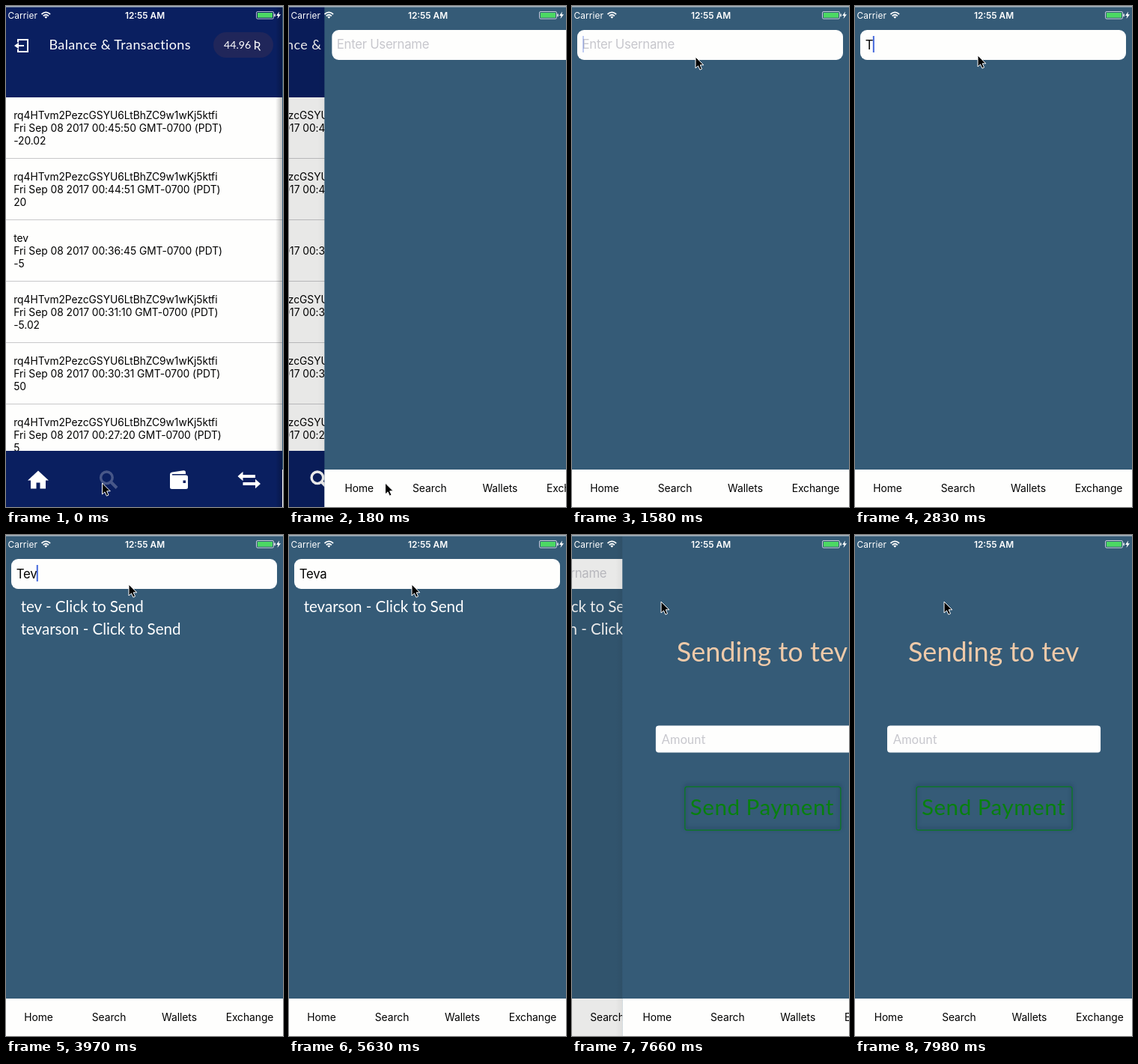
Write an HTML page that moves like this. It is 370x669 px and loops after 8 s.

```html
<!DOCTYPE html>
<html lang="en">
<head>
<meta charset="utf-8">
<title>Wallet app</title>
<style>
  html, body { margin: 0; width: 100%; height: 100%; overflow: hidden; background: #355b77; }
  svg { display: block; width: 370px; height: 669px; }
  text { white-space: pre; }
  .ui { font: 13.8px Inter, sans-serif; letter-spacing: -.03px; }
  .field { font: 16.77px Inter, sans-serif; letter-spacing: -.3px; }
  .bar { font: 11.84px Inter, sans-serif; fill: #fff; }
  .clock { font-weight: 600; }
  .brand { font-family: Lato, sans-serif; }
</style>
</head>
<body>
<svg id="stage" viewBox="0 0 370 669" xmlns="http://www.w3.org/2000/svg"></svg>
<script>
const LOOP = 8000, WIDTH = 372, PARALLAX = 0.3;
const NAVY = '#0a1f60', BLUE = '#355b77', WHITE = '#fefefd', HINT = '#c7c7cd';
const ADDRESS = 'rq4HTvm2PezcGSYU6LtBhZC9w1wKj5ktfi';

const rect = (x, y, w, h, fill, more = '') =>
  `<rect x="${x}" y="${y}" width="${w}" height="${h}" fill="${fill}" ${more}/>`;
const label = (x, y, str, cls, more = '') =>
  `<text x="${x}" y="${y}" class="${cls}" ${more}>${str}</text>`;
const brand = (x, y, str, size, gap, fill, more = '') =>
  label(x, y, str, 'brand', `font-size="${size}" letter-spacing="${gap}" fill="${fill}" ${more}`);

const entries = [
  [ADDRESS, '00:45:50', '-20.02'],
  [ADDRESS, '00:44:51', '20'],
  ['tev', '00:36:45', '-5'],
  [ADDRESS, '00:31:10', '-5.02'],
  [ADDRESS, '00:30:31', '50'],
  [ADDRESS, '00:27:20', '5']
];

function entry([who, time, amount], i) {
  const y = 122 + 82 * i;
  return label(10.2, y + 28.5, who, 'ui') +
    label(10.2, y + 45.5, `Fri Sep 08 2017 ${time} GMT-0700 (PDT)`, 'ui') +
    label(10.2, y + 62.5, amount, 'ui') +
    rect(0, y + 81, 376, 1, '#c8c8ca');
}

const icons = `
  <g fill="#fff">
    <path d="M43 620.5L57 633.5H53V644.5H45.5V636.5H40.5V644.5H33V633.5H29Z"/>
    <g id="lens" fill="none" stroke="#fff" stroke-width="3.4">
      <circle cx="134.4" cy="629.8" r="7.8"/><path d="M140 635.5L148 643.5" stroke-width="4"/>
    </g>
    <path fill-rule="evenodd" d="M219 625.5Q219 623 222 622.4L237 620.3Q240 620 240 623V625H222V626.5H240.5Q243 626.5 243 629V642.5Q243 645 240.5 645H221.5Q219 645 219 642.5ZM236.5 633.5V637H240V633.5Z"/>
    <path d="M309.5 628L316.5 621.8V626H333V630H316.5V634.2ZM340 638L333 631.8V636H316.5V640H333V644.2Z"/>
  </g>`;

const homeScreen =
  rect(0, 0, 376, 669, WHITE) + entries.map(entry).join('') +
  rect(0, 0, 376, 122, NAVY) + rect(0, 594, 376, 75, NAVY) +
  `<path d="M16 48.5V45H29V61H16V57.5M16 53H24" fill="none" stroke="#fff" stroke-width="2"/>
   <path d="M11 53L17 48.8V57.2Z" fill="#fff"/>` +
  brand(57.5, 58, 'Balance &amp; Transactions', 18, .37, '#fff') +
  rect(277, 35, 80, 34, '#20265a', 'rx="17"') +
  brand(291, 57, '44.96', 14.2, 0, '#fff') +
  `<text x="330.5" y="57.5" font-family="Noto Sans, DejaVu Sans, sans-serif" font-size="16" fill="#fff">Ʀ</text>` +
  icons;

// Backdrop, edge shadow and tab bar shared by the pushed screens
const page = body =>
  `<g class="edge">${rect(-12, 2, 9, 667, 'url(#edge)')}</g>` +
  rect(-3, 0, 380, 669, BLUE) + body + rect(-3, 619, 380, 50, WHITE) +
  ['Home', 'Search', 'Wallets', 'Exchange'].map((name, i) =>
    label(43.5 + 94 * i, 649, name, 'ui', 'text-anchor="middle"')).join('');

const searchScreen = page(
  rect(7, 32, 355, 40, WHITE, 'rx="9"') +
  label(13.5, 57.2, 'Enter Username', 'field', `id="hint" fill="${HINT}"`) +
  label(13.8, 57.5, '', 'field', 'id="typed"') +
  rect(14, 40, 2, 22, '#4468dc', 'id="caret"') +
  [0, 1, 2, 3].map(i => brand(19.7, 103 + 30 * i, '', 20.6, -.04, '#fff', 'data-row')).join(''));

const sendScreen = page(
  brand(183.7, 169, 'Sending to tev', 36, .05, '#efcaa9', 'text-anchor="middle"') +
  rect(41.6, 254.5, 285, 36, WHITE, 'rx="4"') +
  brand(49.6, 279, 'Amount', 16.3, .2, HINT) +
  rect(80.6, 336.2, 208, 58, 'none',
    'rx="3" stroke="#087d1c" stroke-width="1.2" style="filter:drop-shadow(0 -2px 2.5px rgba(8,24,66,.6))"') +
  brand(87.6, 374, 'Send Payment', 29.6, .5, '#08800f'));

const statusBar = `
  ${rect(0, 0, 370, 1.6, '#a9b5be')}
  ${label(2.6, 16.5, 'Carrier', 'bar', 'letter-spacing=".1"')}
  ${label(185.5, 16.5, '12:55 AM', 'bar clock', 'text-anchor="middle"')}
  <g fill="none" stroke="#fff" stroke-width="1.7">
    <path d="M47.5 11Q53.3 5.8 59.1 11M49.7 13.3Q53.3 10.2 56.9 13.3"/>
    <path d="M51.3 14.6Q53.3 13 55.3 14.6L53.3 16.8Z" fill="#fff" stroke="none"/>
    <rect x="334.5" y="7.5" width="23" height="9.6" rx="1.6" stroke-width=".9" opacity=".8"/>
  </g>
  ${rect(336, 9, 20, 6.6, '#4cd964')}
  ${rect(358.4, 10.5, 1.4, 3.6, '#fff')}
  <path d="M365 7.5L361 13H363.5L362.5 17L367 11.2H364.3Z" fill="#fff"/>`;

const stage = document.getElementById('stage');
stage.innerHTML = `
  <defs><linearGradient id="edge"><stop offset="0" stop-opacity="0"/><stop offset="1" stop-opacity=".25"/></linearGradient></defs>
  <g id="home">${homeScreen}</g>
  <rect id="dim1" width="370" height="669"/>
  <g id="search">${searchScreen}</g>
  <rect id="dim2" width="370" height="669"/>
  <g id="send">${sendScreen}</g>
  ${statusBar}
  <path id="mouse" d="M0 0V15L3.5 11.9L5.9 17.2L8.5 16L6.2 10.8H10.8Z" stroke="#fff" stroke-width="1"/>`;

const $ = id => document.getElementById(id);
const rows = [...stage.querySelectorAll('[data-row]')];
const clamp = v => Math.min(1, Math.max(0, v));

// Last value whose time has come
const hold = (keys, t) => keys.reduce((v, [at, next]) => t >= at ? next : v, keys[0][1]);

// Linear interpolation between [time, value] keys
function ramp(keys, t) {
  const i = keys.findIndex(k => k[0] > t);
  if (i < 0) return keys[keys.length - 1][1];
  if (!i) return keys[0][1];
  const [a, from] = keys[i - 1], [b, to] = keys[i];
  return from + (to - from) * (t - a) / (b - a);
}

const typing = [[0, ''], [2830, 'T'], [3550, 'Te'], [3850, 'Tev'], [4870, 'Teva'], [5810, 'Tev'], [7240, '']];
const short = ['tev', 'tevarson'];
const results = [[0, []], [3010, ['tabin', 'tella', ...short]], [3730, short],
  [5050, ['tevarson']], [5930, short]];
const blink = [[799, 0], [800, 1], [1040, 1], [1240, 0], [1500, 0], [1740, 1], [2030, 1], [2270, 0],
  [2610, 0], [2800, 1], [4420, 1], [4570, 0], [4869, 0], [4870, 1], [5390, 1], [5630, 0],
  [5809, 0], [5810, 1], [6330, 1], [6570, 0], [6850, 0], [7070, 1]];
const firstPush = [0, 60, 120, 180, 270, 330, 390, 450, 510];
const secondPush = [0, 90, 150, 210, 270, 330, 390, 500];

// Decaying slide, sampled at the times it is shown
function slide(t, steps) {
  if (t < 0) return WIDTH;
  const at = steps.filter(s => s <= t).pop();
  return at > 500 ? 0 : WIDTH * Math.exp(-at / 90);
}

function push(top, below, dim, x) {
  const p = 1 - x / WIDTH;
  top.setAttribute('transform', `translate(${x})`);
  top.querySelector('.edge').style.opacity = 1 - p;
  below.setAttribute('transform', `translate(${(x - WIDTH) * PARALLAX})`);
  dim.setAttribute('opacity', 0.1 * p);
}

function mouseAt(t) {
  const ease = (a, b) => { const k = clamp((t - a) / (b - a)); return k * k * (3 - 2 * k); };
  const up = ease(1040, 1540), nudge = ease(2030, 2250), pick = ease(6420, 6960);
  return [128.5 + 36.5 * up - nudge - 45 * pick, 637 - 569 * up - 2 * nudge + 23 * pick];
}

function draw(t) {
  const x1 = slide(t, firstPush), x2 = slide(t - 7480, secondPush);
  push($('search'), $('home'), $('dim1'), x1);
  if (t >= 7480) push($('send'), $('search'), $('dim2'), x2);
  else $('dim2').setAttribute('opacity', 0);
  $('send').style.display = t < 7480 ? 'none' : '';
  $('lens').setAttribute('opacity', t < 60 ? 0.25 : clamp(0.25 + t / 240));

  const text = hold(typing, t), found = hold(results, t);
  $('typed').textContent = text;
  $('hint').style.display = text ? 'none' : '';
  $('caret').setAttribute('x', text ? 13.3 + $('typed').getComputedTextLength() : 14);
  $('caret').setAttribute('opacity', ramp(blink, t));
  rows.forEach((row, i) => row.textContent = found[i] ? `${found[i]} - Click to Send` : '');
  $('mouse').setAttribute('transform', `translate(${mouseAt(t)})`);
}

const start = performance.now();
function tick() {
  draw((performance.now() - start) % LOOP);
  requestAnimationFrame(tick);
}
tick();
</script>
</body>
</html>
```
